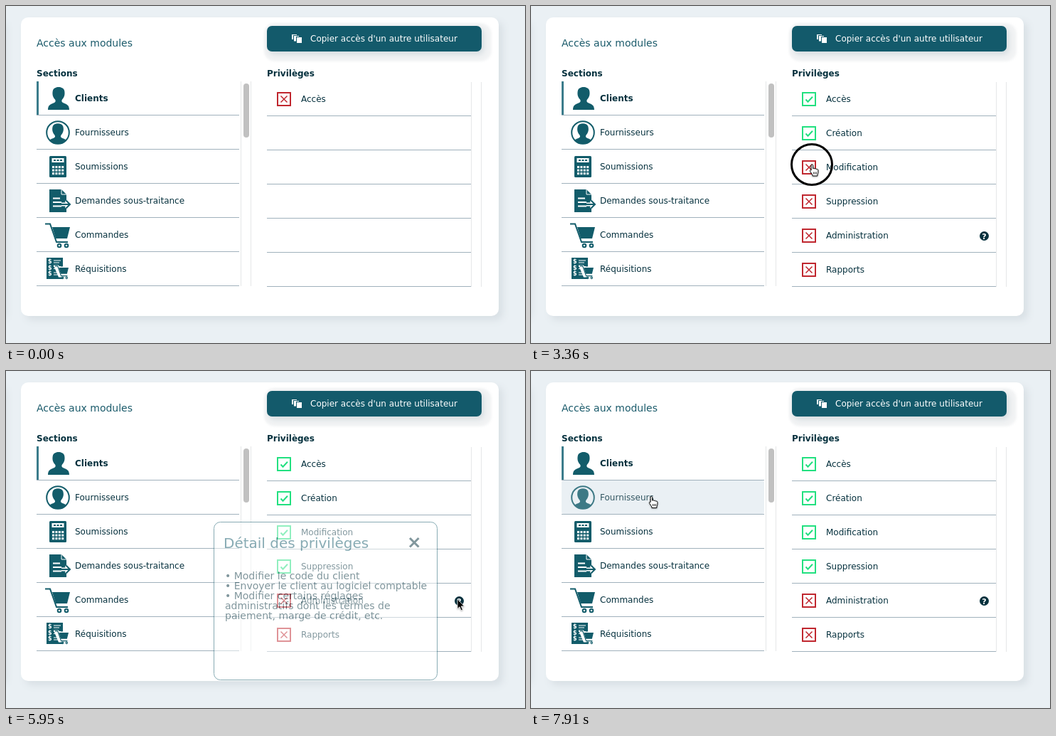
Animation of 730 by 474 pixels, one loop 8000 ms. Source, as an HTML page:

```html
<!DOCTYPE html>
<html lang="fr">
<head>
<meta charset="utf-8">
<title>Accès aux modules</title>
<style>
  html, body { margin: 0; width: 100%; height: 100%; overflow: hidden; background: #eaf0f4; }
  svg { display: block; width: 730px; height: 474px; }
  text { font: 12px "DejaVu Sans", Verdana, sans-serif; fill: #06313e; white-space: pre; }
  .bold { font-weight: bold; }
  .card { fill: #fff; filter: drop-shadow(6px 6px 5px #d9e0e5); }
  .teal { fill: #125c6a; }
  .line { fill: none; stroke: #125c6a; stroke-width: 2; }
  .white { fill: #fff; }
  .cut { fill: none; stroke: #fff; stroke-width: 2; }
  .rule { stroke: #a0b1bc; }
  .edge { stroke: #e5e7e8; }
  .no { fill: none; stroke: #c0272f; stroke-width: 2; }
  .yes { fill: none; stroke: #22e080; stroke-width: 2; }
</style>
</head>
<body>
<svg id="stage" viewBox="0 0 730 474"></svg>
<script>
const LOOP = 8000, STEP = 70, ROW = 48;
const sections = ['Clients', 'Fournisseurs', 'Soumissions', 'Demandes sous-traitance', 'Commandes', 'Réquisitions'];
const privileges = ['Accès', 'Création', 'Modification', 'Suppression', 'Administration', 'Rapports'];
const details = ['• Modifier le code du client', '• Envoyer le client au logiciel comptable',
  '• Modifier certains réglages', 'administratifs dont les termes de', 'paiement, marge de crédit, etc.'];

const grantTimes = [2030, 3080, 3710, 4410];
// time, x, y, radius
const clicks = [
  [1120, 392, 129, 20], [1610, 393.5, 134, 29.5], [2660, 388, 179, 29.5], [3360, 395, 223, 28.5],
  [3990, 395.5, 275, 29.5], [5880, 635, 323, 20], [6930, 635, 323, 20]
];
// time, x, y
const path = [
  [420, 68, 414], [1120, 392, 128], [1190, 392, 128], [1400, 393, 134.5], [2170, 393, 134.5],
  [2520, 385, 180], [2660, 385, 180], [3290, 395.5, 223], [3430, 395.5, 223], [3710, 395, 276],
  [4830, 395, 276], [5390, 605, 328], [5740, 635, 321], [7210, 635, 321], [7280, 633, 323],
  [7350, 633, 323], [7910, 169.5, 176.5]
];

const text = (x, y, s, attrs = '') => `<text x="${x}" y="${y}" ${attrs}>${s}</text>`;
const shape = (d, cls, attrs = '') => `<path d="${d}" class="${cls}" ${attrs}/>`;
const rect = (x, y, w, h, attrs) => `<rect x="${x}" y="${y}" width="${w}" height="${h}" ${attrs}/>`;
const range = (n, draw) => Array.from({ length: n }, (_, i) => draw(i)).join('');

const person = attrs => shape('M-15 16c0-7 4-8 9-10 2-1 2-3 1-4.5-4-4-4-9-3-13 2-6 14-6 16 0 1 4 1 9-3 13-1 1.5-1 3.5 1 4.5 5 2 9 3 9 10z', 'teal', attrs);
const cart = attrs => `<g ${attrs}>` + shape('M65 311h25l-4 16h-16z', 'teal') +
  shape('M55 306.5h7l9 25.500h16', 'line') +
  '<circle cx="75" cy="337" r="2.300" class="line"/><circle cx="85" cy="337" r="2.300" class="line"/></g>';

const icons = [
  person('transform="translate(74 130)"'),
  '<clipPath id="disc"><circle cx="73" cy="178" r="15.500"/></clipPath><circle cx="73" cy="178" r="15.800" class="line"/>' +
    `<g clip-path="url(#disc)">${person('transform="translate(73 180) scale(.92)"')}</g>`,
  rect(61, 211, 24, 30, 'rx="1.500" class="teal"') + rect(64.5, 214, 17, 6, 'class="white"') +
    range(3, i => rect(67 + i * 4.5, 216, 3, 2, 'class="teal"')) +
    range(12, i => rect(65 + i % 4 * 4.4, 225 + (i / 4 | 0) * 4.6, 3, 3, 'class="white"')),
  shape('M61 258h17l7 7v25h-24z', 'teal') + shape('M78 258v7h7', 'cut', 'style="stroke-width:1"') +
    shape('M66 270.500h10M66 276h12M66 281.500h12', 'cut') +
    shape('M78 279h11M84.500 273.500l5.500 5.500l-5.500 5.500', 'cut', 'style="stroke-width:5"') +
    shape('M78 279h11M84.500 273.500l5.500 5.500l-5.500 5.500', 'line'),
  cart(''),
  rect(57, 354, 23, 30, 'class="teal"') +
    range(3, i => text(59, 362 + i * 8.5, '$', 'class="bold" style="font-size:8px;fill:#fff"') +
      shape(`M67 ${358 + i * 8.5}h10m-10 3h8`, 'cut', 'style="stroke-width:1"')) +
    shape('M69 366h4l1 2h14l-3 12h-10z', 'white', 'stroke="#fff" stroke-width="3"') +
    cart('transform="translate(38.5 197) scale(.55)"')
];

const section = (name, i) => {
  const y = 106 + i * ROW;
  return (i === 1 ? rect(43, y, 285, 47, 'id="hover" rx="3" fill="#eaf0f4"') : '') +
    `<g id="section${i}">${icons[i]}${text(97, y + 28, name, i ? '' : 'class="bold"')}</g>` +
    shape(`M43 ${y + 47.5}h285`, 'rule');
};

const privilege = (name, i) => {
  const y = 131 + i * ROW;
  const box = 'M382 -9h18v18h-18z';
  return shape(`M367 ${y + 23.5}h287`, 'rule') +
    `<g id="privilege${i}"><g transform="translate(0 ${y})">` +
    `<g id="denied${i}">${shape(box, 'no')}${shape('M386.500 -4.500l9 9m0-9l-9 9', 'no', 'style="stroke-width:1.500"')}</g>` +
    `<g id="granted${i}">${shape(box, 'yes')}${shape('M386.500 .5l3 3.200l6.500-7', 'yes')}</g></g>` +
    text(415, y + 4, name) +
    (i === 4 ? '<circle cx="637.500" cy="323.500" r="6.500" fill="#06313e"/>' +
      text(637.5, 327.5, '?', 'class="bold" text-anchor="middle" style="font-size:11px;fill:#fff"') : '') + '</g>';
};

const stage = document.getElementById('stage');
stage.innerHTML =
  rect(0, 0, 730, 474, 'fill="#eaf0f4"') +
  rect(-60, 16, 55, 420, 'rx="10" class="card"') +
  rect(21, 16, 672, 420, 'rx="10" class="card"') +
  rect(363, 24, 320, 54, 'rx="15" fill="#f3f4f5" style="filter:blur(1.500px)"') +
  rect(367, 28, 302, 36, 'rx="7" fill="#135a6b" style="filter:drop-shadow(3px 4px 4px #d3dbdf)"') +
  rect(402, 40, 7, 7, 'class="white"') +
  rect(404.5, 41.5, 8, 8.5, 'class="white" stroke="#135a6b"') +
  rect(408.5, 43.5, 8, 9, 'class="white" stroke="#135a6b"') +
  text(428, 50, "Copier accès d'un autre utilisateur", 'style="fill:#fff"') +
  text(43, 57, 'Accès aux modules', 'style="font-size:14px;fill:#1b5b6b"') +
  text(43, 99, 'Sections', 'class="bold"') +
  text(367, 99, 'Privilèges', 'class="bold"') +
  sections.map(section).join('') +
  rect(43, 106, 3, 47, 'fill="#3b7c8b"') +
  shape('M330.500 106v288M344.500 106v288M654.500 107v288M668.500 107v288', 'edge') +
  rect(334, 109, 8, 76, 'rx="4" fill="#c1c1c1"') +
  privileges.map(privilege).join('') +
  '<g id="popup">' + rect(292.5, 212.5, 314, 222, 'rx="9" fill="#fff" stroke="#135a6b"') +
  text(306, 249, 'Détail des privilèges', 'style="font-size:20px;fill:#135a6b"') +
  shape('M568 235l12.500 12.500m0-12.500l-12.500 12.500', '', 'stroke="#06313e" stroke-width="3"') +
  details.map((s, i) => text(308, 293 + i * 14, s, 'style="font-size:14px"')).join('') + '</g>' +
  '<circle id="click" fill="none" stroke="#000" stroke-width="3"/>' +
  '<g id="cursor" style="filter:drop-shadow(0 1px 1px #0005)">' +
  shape('M0 0v13.500l3-2.800 2.200 5 2.200-.9-2.200-4.900h4.300z', '', 'id="arrow" stroke="#fff" stroke-width=".8"') +
  '<g id="hand" stroke="#000">' +
  shape('M-1.400 1.200c0-1.600 2.600-1.600 2.600 0v4.600c.3-1 2.400-.9 2.500.4.5-.9 2.400-.6 2.500.7.5-.7 2.200-.4 2.200 1v3.300c0 1-.8 2-1 3.200v1.600h-7v-1.400c-.9-1.600-2-3-3.200-5-1-1.600.7-2.500 1.400-1.400z', 'white') +
  shape('M2 10.500v3M4 10.500v3M6 10.500v3', '', 'stroke-width=".8"') + '</g></g>';

const el = id => document.getElementById(id);
const show = (id, visible) => { el(id).style.display = visible ? '' : 'none'; };

function cursorAt(t) {
  const next = path.findIndex(key => key[0] > t);
  if (next < 0) return path.at(-1).slice(1);
  if (next === 0) return path[0].slice(1);
  const [t0, x0, y0] = path[next - 1], [t1, x1, y1] = path[next];
  const p = (t - t0) / (t1 - t0), e = p * p * (3 - 2 * p);
  return [x0 + (x1 - x0) * e, y0 + (y1 - y0) * e];
}

function popupOpacity(t) {
  if (t < 5950 || t >= 7070) return 0;
  return t < 6020 || t >= 7000 ? 0.5 : 1;
}

function render(t) {
  privileges.forEach((_, i) => {
    const granted = t >= grantTimes[i];
    show('privilege' + i, i === 0 || t >= grantTimes[0]);
    show('granted' + i, granted);
    show('denied' + i, !granted);
  });

  const [x, y] = cursorAt(t);
  const leaving = t > 7350;
  const hovering = leaving && x < 328 && y >= 154 && y < 202;
  const hand = (t >= 1260 && t < 4900) || (leaving && x < 328);
  show('cursor', t >= 420);
  show('hand', hand);
  show('arrow', !hand);
  el('cursor').setAttribute('transform', `translate(${x} ${y})`);
  show('hover', hovering);
  el('section1').style.opacity = hovering ? 0.8 : 1;

  el('popup').style.opacity = popupOpacity(t);
  const click = clicks.find(c => t >= c[0] && t < c[0] + STEP);
  show('click', click);
  if (click) ['cx', 'cy', 'r'].forEach((name, i) => el('click').setAttribute(name, click[i + 1]));
}

const start = performance.now();
function frame() {
  const t = (performance.now() - start) % LOOP;
  render(Math.floor(t / STEP) * STEP);
  requestAnimationFrame(frame);
}
frame();
</script>
</body>
</html>
```
